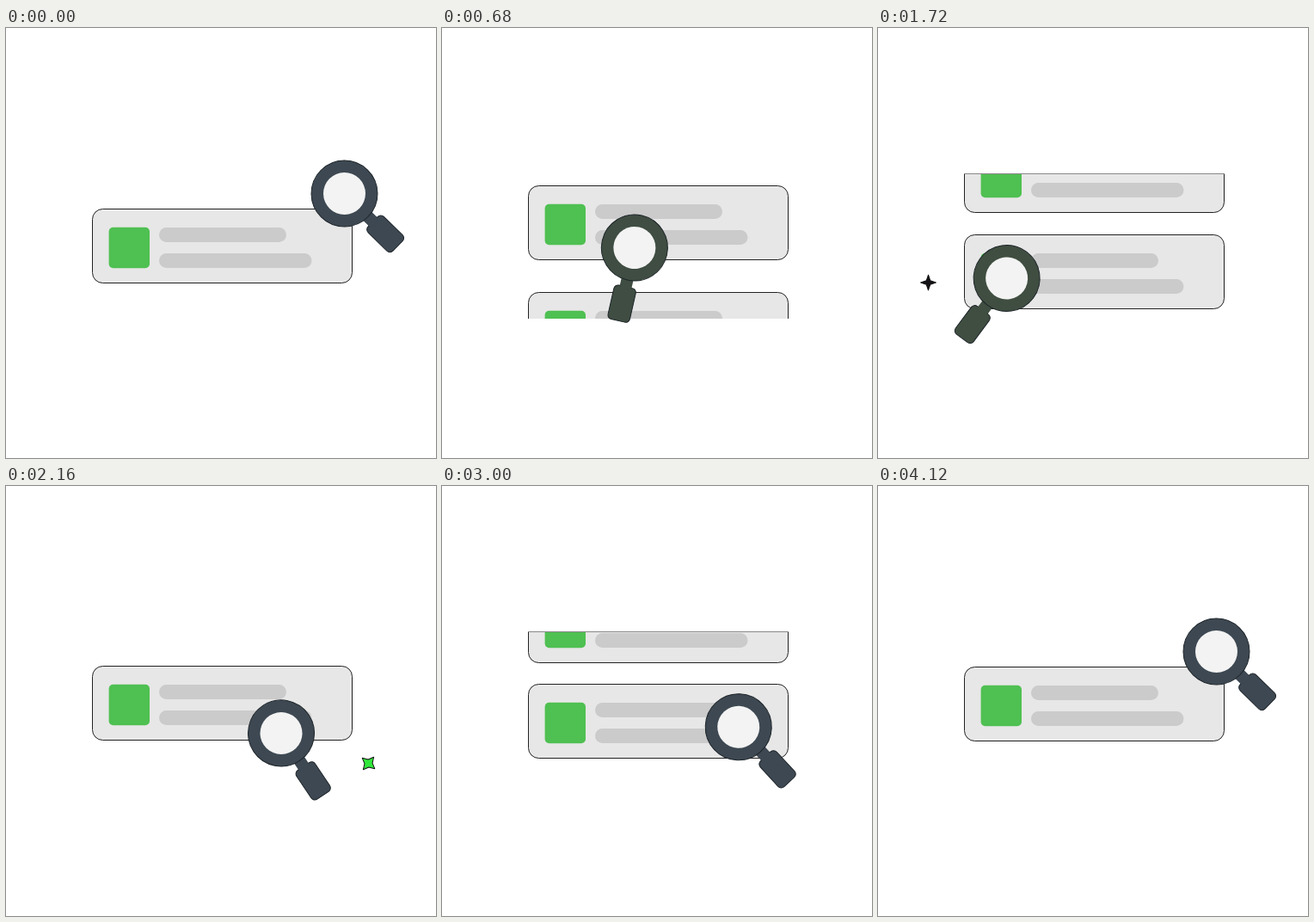
Animation of 500 by 500 pixels, one loop 4200 ms. Source, as an HTML page with a canvas:

```html
<!DOCTYPE html>
<html lang="en">
<head>
<meta charset="utf-8">
<title>Search results</title>
<style>
html, body { margin: 0; height: 100%; overflow: hidden; background: #fff; }
canvas { display: block; width: 500px; height: 500px; }
</style>
</head>
<body>
<canvas id="stage" width="500" height="500"></canvas>
<script>
const ctx = document.getElementById('stage').getContext('2d');
const LOOP = 4200, REST = 210, TRAVEL = 128, TOP = 169, BOTTOM = REST + TRAVEL;

// Resting poses of the magnifier and the moments it leaves each one
const poses = [
  { x: 393.5, y: 192.5, a: 44.5 },
  { x: 127, y: 291.5, a: 136 },
  { x: 341, y: 287, a: 47.5 },
];
const moves = [250, 1574, 2882];
const scrolls = [119, 1398, 2719];
const sparkles = [{ x: 58.5, y: 296, start: 1000 }, { x: 421.5, y: 322.5, start: 2000 }];

const clamp = v => Math.min(1, Math.max(0, v));
const ease = v => { const s = clamp(v); return s * s * (3 - 2 * s); };
const mix = (a, b, k) => a + (b - a) * k;
const rgb = (a, b, k) => `rgb(${a.map((v, i) => Math.round(mix(v, b[i], k))).join()})`;

function box(x, y, w, h, r, fill, line) {
  ctx.beginPath();
  ctx.roundRect(x, y, w, h, r);
  ctx.fillStyle = fill;
  ctx.fill();
  if (line) {
    ctx.strokeStyle = line;
    ctx.stroke();
  }
}

function card(y) {
  box(100.5, y + .5, 302, 86, 12, '#e7e7e7', '#222');
  box(119.6, y + 21.8, 47.4, 47.4, 5, '#4fc052');
  box(178, y + 22, 148, 17, 8.5, '#cbcbcb');
  box(178, y + 52, 177.5, 17, 8.5, '#cbcbcb');
  // Fine edge where the card is cut off
  if (y < TOP && y + 87 > TOP) {
    ctx.fillStyle = '#888';
    ctx.fillRect(100, TOP, 303, 1);
  }
}

// A new card drops in from above; the old one follows a little later and leaves below
function results(t) {
  const age = t - (scrolls.findLast(s => s <= t) ?? scrolls[0]);
  ctx.save();
  ctx.beginPath();
  ctx.rect(0, TOP, 500, BOTTOM - TOP);
  ctx.clip();
  card(REST + Math.round(TRAVEL * ease((age - 115) / 660)));
  card(REST + Math.round(TRAVEL * (ease(age / 800) - 1)));
  ctx.restore();
}

function magnifier(t) {
  const p = { ...poses[0] };
  moves.forEach((start, i) => {
    const k = ease((t - start) / 728), to = poses[(i + 1) % 3];
    for (const key in p) p[key] = mix(p[key], to[key], k);
  });
  const tint = ease(((p.a - 47) / 89 - .3) / .4);
  const body = rgb([61, 72, 82], [63, 78, 64], tint), line = '#1d2429';
  ctx.save();
  ctx.translate(p.x, p.y);
  ctx.rotate(p.a * Math.PI / 180);
  box(35, -7, 17, 14, 0, body);
  box(46.5, -13, 40.5, 26, 5, body, line);
  box(35, -6.5, 14, 13, 0, body);
  box(-38.5, -38.5, 77, 77, 38.5, body, line);
  box(-24.5, -24.5, 49, 49, 24.5, '#f3f3f3');
  ctx.restore();
}

function sparkle({ x, y, start }, t) {
  const age = t - start;
  if (age < 0 || age > 780) return;
  const size = 9.5 * ease(age / 130) * (1 - ease((age - 710) / 70));
  const fade = ease((age - 350) / 350);
  ctx.save();
  ctx.translate(x, y);
  ctx.rotate(age * .25 * Math.PI / 180);
  ctx.beginPath();
  for (let i = 0; i < 8; i++) {
    const r = i % 2 ? size * mix(.48, .36, fade) : size;
    ctx.lineTo(r * Math.cos(i * Math.PI / 4), r * Math.sin(i * Math.PI / 4));
  }
  ctx.closePath();
  ctx.lineJoin = 'round';
  ctx.fillStyle = rgb([48, 232, 58], [20, 18, 22], fade);
  ctx.fill();
  ctx.strokeStyle = '#111';
  ctx.stroke();
  ctx.restore();
}

const origin = performance.now();
function draw() {
  const t = (performance.now() - origin) % LOOP;
  ctx.fillStyle = '#fff';
  ctx.fillRect(0, 0, 500, 500);
  ctx.lineWidth = 1;
  results(t);
  sparkles.forEach(s => sparkle(s, t));
  magnifier(t);
  requestAnimationFrame(draw);
}
draw();
</script>
</body>
</html>
```
